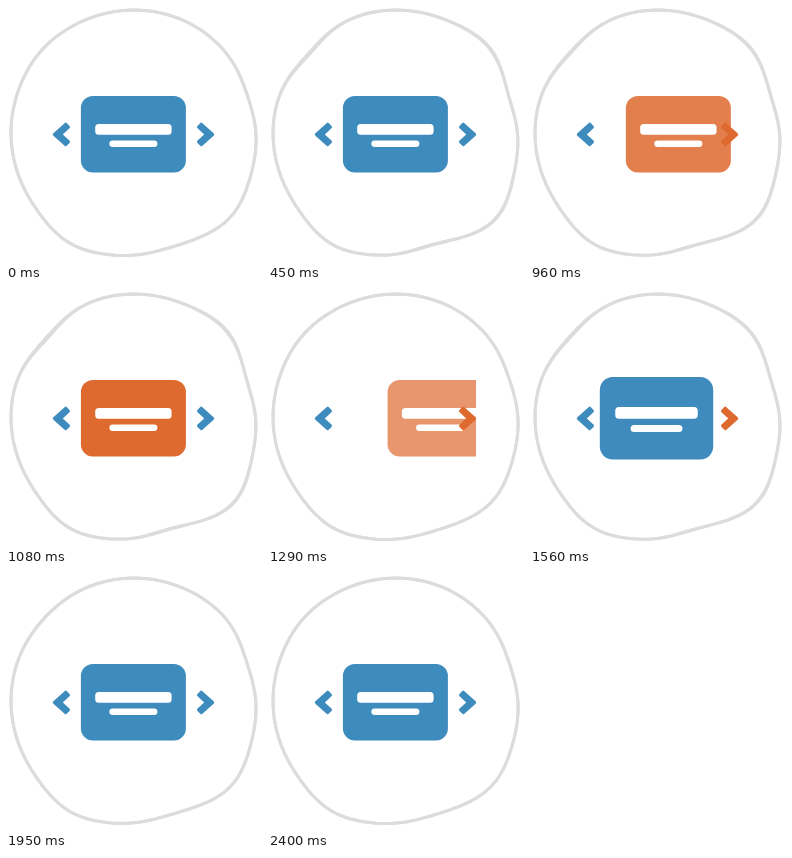
Recreate the animation shown at these times as an HTML page with a canvas. Size 256 by 256 pixels, loop 2.49 s.

```html
<!DOCTYPE html>
<html lang="en">
<head>
<meta charset="utf-8">
<title>Carousel</title>
<style>
  html, body { margin: 0; width: 100%; height: 100%; overflow: hidden; background: #fff; }
  canvas { display: block; width: 100vw; height: 100vh; }
</style>
</head>
<body>
<canvas id="stage"></canvas>
<script>
const SIZE = 256, LOOP = 2490, TICK = 30;
const START = 800, SLIDE = 350, SLIDES = 3;
const BLUE = [62, 139, 190], ORANGE = [222, 106, 47];
const MID = { x: 127.4, y: 128.3 }, TRAVEL = 150;

// The ring is a circle with soft bumps; the wobble steps through how edgy they are.
const EDGES = [0, 0.3, 0.8, 1];
const BUMPS = [
  { at: 40, calm: 5, edgy: 9 },
  { at: 73, calm: -3, edgy: -6 },
  { at: 120, calm: 4.5, edgy: 5.5 },
  { at: 222, calm: 1, edgy: -6 },
  { at: 317, calm: -0.5, edgy: 4.5 },
  { at: 342, calm: -3.5, edgy: -5 }
];

const canvas = document.getElementById('stage');
const ctx = canvas.getContext('2d');

const ramp = (t, a, b) => Math.min(1, Math.max(0, (t - a) / (b - a)));
const lerp = (a, b, k) => a + (b - a) * k;
const mix = (a, b, k) => `rgb(${a.map((v, i) => Math.round(lerp(v, b[i], k)))})`;

function resize() {
  const dpr = window.devicePixelRatio || 1;
  canvas.width = Math.round(innerWidth * dpr);
  canvas.height = Math.round(innerHeight * dpr);
}

function ringRadius(deg, edge) {
  return BUMPS.reduce((r, b) => {
    const d = (deg - b.at + 540) % 360 - 180;
    return r + lerp(b.calm, b.edgy, edge) * Math.exp(-((d / 17) ** 2));
  }, 123);
}

function strokeRing(edge) {
  ctx.beginPath();
  for (let deg = 0; deg < 360; deg += 3) {
    const a = deg * Math.PI / 180, r = ringRadius(deg, edge);
    ctx.lineTo(128 + r * Math.cos(a), 127 + r * Math.sin(a));
  }
  ctx.closePath();
  ctx.stroke();
}

// Two close passes give the line its uneven, hand-drawn weight.
function drawRing(edge) {
  ctx.strokeStyle = '#dcdcdc';
  ctx.lineWidth = 3;
  ctx.lineJoin = 'round';
  strokeRing(edge);
  strokeRing(edge * 0.8);
}

// A box centred on the card's middle, dy below it.
function bar(w, h, dy, r, color) {
  ctx.beginPath();
  ctx.roundRect(-w / 2, dy - h / 2, w, h, r);
  ctx.fillStyle = color;
  ctx.fill();
}

function drawCard({ x, scale, alpha, color }) {
  ctx.save();
  ctx.beginPath();
  ctx.rect(47, 0, 161, SIZE);
  ctx.clip();
  ctx.globalAlpha = alpha;
  ctx.translate(MID.x + x, MID.y);
  ctx.scale(scale, scale);
  bar(105, 76.4, 0, 12, color);
  ctx.globalAlpha = 1;
  bar(76.4, 10.8, -5, 3.5, '#fff');
  bar(48, 6.6, 9.4, 3.3, '#fff');
  ctx.restore();
}

function drawArrow(side, color) {
  ctx.save();
  ctx.translate(127.5, 128.4);
  ctx.scale(side, 1);
  ctx.beginPath();
  ctx.moveTo(67.8, -10);
  ctx.lineTo(79, 0);
  ctx.lineTo(67.8, 10);
  ctx.lineTo(65.2, 7.3);
  ctx.lineTo(73.2, 0);
  ctx.lineTo(65.2, -7.3);
  ctx.closePath();
  ctx.fillStyle = ctx.strokeStyle = color;
  ctx.lineWidth = 3.4;
  ctx.lineJoin = 'round';
  ctx.fill();
  ctx.stroke();
  ctx.restore();
}

// Each click: swell, leave to the left, come back from the right in orange, cool to blue.
function cardAt(q) {
  if (q < 99) {
    const gone = ramp(q, 45, 99) ** 4;
    return { x: -TRAVEL * gone, scale: 1 + 0.08 * ramp(q, 0, 35), alpha: 1 - gone, color: mix(BLUE, ORANGE, 0) };
  }
  const left = (1 - ramp(q, 99, 256)) ** 4;
  return { x: TRAVEL * left, scale: 1, alpha: 1 - left, color: mix(ORANGE, BLUE, ramp(q, 285, 350)) };
}

function draw(t) {
  const s = t - START;
  const q = s >= 0 && s < SLIDE * SLIDES ? s % SLIDE : 0;
  const glow = ramp(q, 0, 30) * (1 - ramp(q, 200, 275));

  ctx.setTransform(canvas.width / SIZE, 0, 0, canvas.height / SIZE, 0, 0);
  ctx.fillStyle = '#fff';
  ctx.fillRect(0, 0, SIZE, SIZE);
  drawRing(EDGES[Math.floor(t / 150) % EDGES.length]);
  drawCard(cardAt(q));
  drawArrow(-1, mix(BLUE, ORANGE, 0));
  drawArrow(1, mix(BLUE, ORANGE, glow));
}

const begin = performance.now();
function loop() {
  const t = (performance.now() - begin) % LOOP;
  draw(Math.floor(t / TICK) * TICK);
  requestAnimationFrame(loop);
}

addEventListener('resize', resize);
resize();
loop();
</script>
</body>
</html>
```
